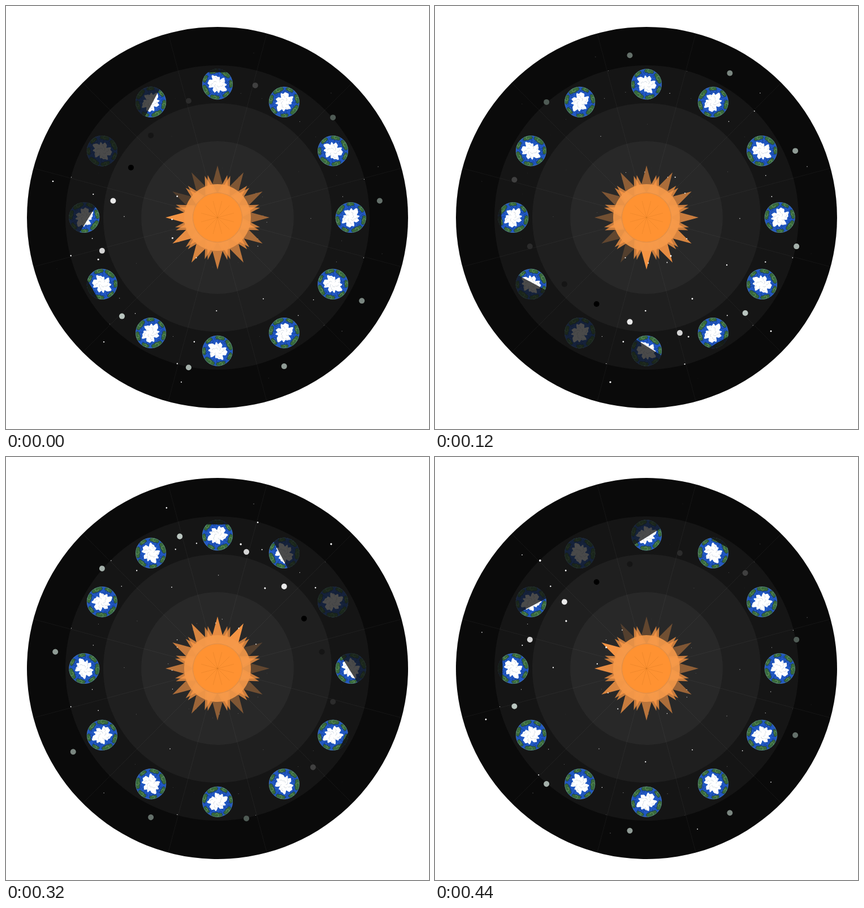
An HTML page with a canvas that plays this animation: 748x748 px, repeating every 480 ms.

```html
<!DOCTYPE html>
<html lang="en">
<head>
<meta charset="utf-8">
<title>Orbit disc</title>
<style>
html, body { margin: 0; width: 100%; height: 100%; overflow: hidden; background: #fff; }
canvas { display: block; width: 748px; height: 748px; }
</style>
</head>
<body>
<canvas id="stage" width="748" height="748"></canvas>
<script>
const ctx = document.getElementById('stage').getContext('2d');
const STEP_MS = 40, STEPS = 12, CENTER = 374;
const ORBIT = 235.7, GLOBE = 27, MOON_ORBIT = 59;
const RINGS = [[337, '#0a0a0a'], [269, '#151515'], [202, '#1f1f1f'], [135, '#282828']];
// radius and angle of the stars repeated in every sector
const STARS = [[298, 12.4], [268, 15.4], [224.5, 20.5], [223.5, 10.6], [165, 0.6], [87.5, 5.4], [80.5, 27.7]];

const rad = deg => deg * Math.PI / 180;
const polar = (r, deg) => [r * Math.cos(rad(deg)), r * Math.sin(rad(deg))];
const noise = n => { const v = Math.sin(n * 12.9898 + 4.1) * 43758.5453; return v - Math.floor(v); };

function disc(x, y, r, fill) {
  ctx.fillStyle = fill;
  ctx.beginPath();
  ctx.arc(x, y, r, 0, 2 * Math.PI);
  ctx.fill();
}

function arc(x, y, r, from, to) {
  ctx.beginPath();
  ctx.arc(x, y, r, from, to);
  ctx.stroke();
}

function pen(color, width) {
  ctx.strokeStyle = color;
  ctx.lineWidth = width;
}

function turned(x, y, deg, draw) {
  ctx.save();
  ctx.translate(x, y);
  ctx.rotate(rad(deg));
  draw();
  ctx.restore();
}

function eachSector(draw) {
  for (let i = 0; i < STEPS; i++) draw(i * 30, (i + 5) % STEPS);
}

function spokes(length, color) {
  pen(color, 0.8);
  eachSector(angle => {
    ctx.beginPath();
    ctx.moveTo(0, 0);
    ctx.lineTo(...polar(length, angle + 15));
    ctx.stroke();
  });
}

function spike(angle, tip, halfWidth, alpha) {
  turned(0, 0, angle, () => {
    ctx.fillStyle = `rgba(255,154,70,${alpha})`;
    ctx.beginPath();
    ctx.moveTo(tip, 0);
    ctx.lineTo(44, halfWidth);
    ctx.lineTo(44, -halfWidth);
    ctx.fill();
  });
}

function drawSun() {
  eachSector((angle, phase) => {
    spike(angle, 92, 13, 0.2 + 0.75 * phase / 11);
    spike(angle - 17, 77, 9, 0.75);
    spike(angle + 17, 77, 9, 0.75);
  });
  disc(0, 0, 59, 'rgba(246,154,74,0.9)');
  disc(0, 0, 43, '#ff9232');
  spokes(30, 'rgba(150,80,10,0.16)');
}

// stars grow with the phase and twinkle from step to step
function drawStars(step) {
  eachSector((angle, phase) => {
    STARS.forEach(([r, offset], i) => {
      const twinkle = noise(angle + i * 7.3 + step * 31.7);
      disc(...polar(r, angle + offset), 1.9 * twinkle * phase / 11, '#fff');
    });
  });
}

function blob(radiusAt) {
  ctx.beginPath();
  for (let a = 0; a < 360; a += 4) ctx.lineTo(...polar(radiusAt(rad(a)), a));
  ctx.closePath();
}

function drawLand(angle, size) {
  const [x, y] = polar(24, angle);
  turned(x, y, angle + 90, () => {
    blob(a => size * (1 + 0.35 * Math.cos(2 * a) + 0.12 * Math.sin(5 * a)));
    ctx.fillStyle = '#386a3b';
    ctx.fill();
    pen('#173550', 0.8);
    ctx.stroke();
    pen('#83a87b', 0.6);
    arc(0, 0, size * 0.45, 0.4, 4.8);
  });
}

function drawGlobe() {
  disc(0, 0, GLOBE, '#2158c2');
  ctx.save();
  ctx.clip();
  pen('#163a8c', 0.8);
  for (let i = 0; i < 14; i++) arc(...polar(18 + i % 3 * 2, i * 26), 2.5 + i % 2, i, i + 4);
  for (let i = 0; i < 7; i++) drawLand(20 + i * 51.4, 4.8 + i % 3 * 1.1);
  blob(a => 14.6 + 1.8 * Math.cos(2 * a) + 1.8 * Math.sin(5 * a + 1) + 1.6 * Math.sin(9 * a) + 1.2 * Math.cos(14 * a));
  ctx.fillStyle = '#fff';
  ctx.fill();
  pen('#bcc6d2', 0.6);
  for (let i = 0; i < 9; i++) arc(...polar(3 + i, i * 80 + 20), 2.6, i * 1.4, i * 1.4 + 2.6);
  ctx.restore();
  pen('rgba(110,150,150,0.6)', 0.7);
  arc(0, 0, GLOBE - 0.3, 0, 2 * Math.PI);
}

// the shadow covers everything beyond a straight edge facing the given angle
function drawShadow(phase) {
  const shadow = {
    0: [0, -30, 0.76], 1: [-32, -3, 0.76], 11: [32, -7, 0.76],
    2: [0, 21, 0.87], 10: [0, 19, 0.87]
  }[phase];
  if (!shadow) return;
  const [facing, edge, alpha] = shadow;
  ctx.beginPath();
  ctx.arc(0, 0, GLOBE + 0.4, 0, 2 * Math.PI);
  ctx.clip();
  ctx.rotate(rad(facing));
  ctx.fillStyle = `rgba(18,18,18,${alpha})`;
  ctx.fillRect(edge, -30, 60, 60);
}

function drawPlanets() {
  eachSector((angle, phase) => {
    const [x, y] = polar(ORBIT, angle);
    turned(x, y, 3 * angle - 60, drawGlobe);
    turned(x, y, angle, () => drawShadow(phase));
    const [mx, my] = polar(MOON_ORBIT, 2 * angle - 30);
    const v = Math.round(255 * phase / 12);
    const green = phase > 3 && phase < 10 ? 6 : 0;
    disc(x + mx, y + my, 5, `rgb(${v - green},${v + green},${v})`);
  });
}

function drawDisc(step) {
  for (const [r, color] of RINGS) disc(0, 0, r, color);
  spokes(337, 'rgba(255,255,255,0.055)');
  drawSun();
  drawStars(step);
  drawPlanets();
}

function frame() {
  const step = Math.floor(performance.now() / STEP_MS) % STEPS;
  ctx.fillStyle = '#fff';
  ctx.fillRect(0, 0, 748, 748);
  turned(CENTER, CENTER, -30 * step, () => drawDisc(step));
  requestAnimationFrame(frame);
}
frame();
</script>
</body>
</html>
```
